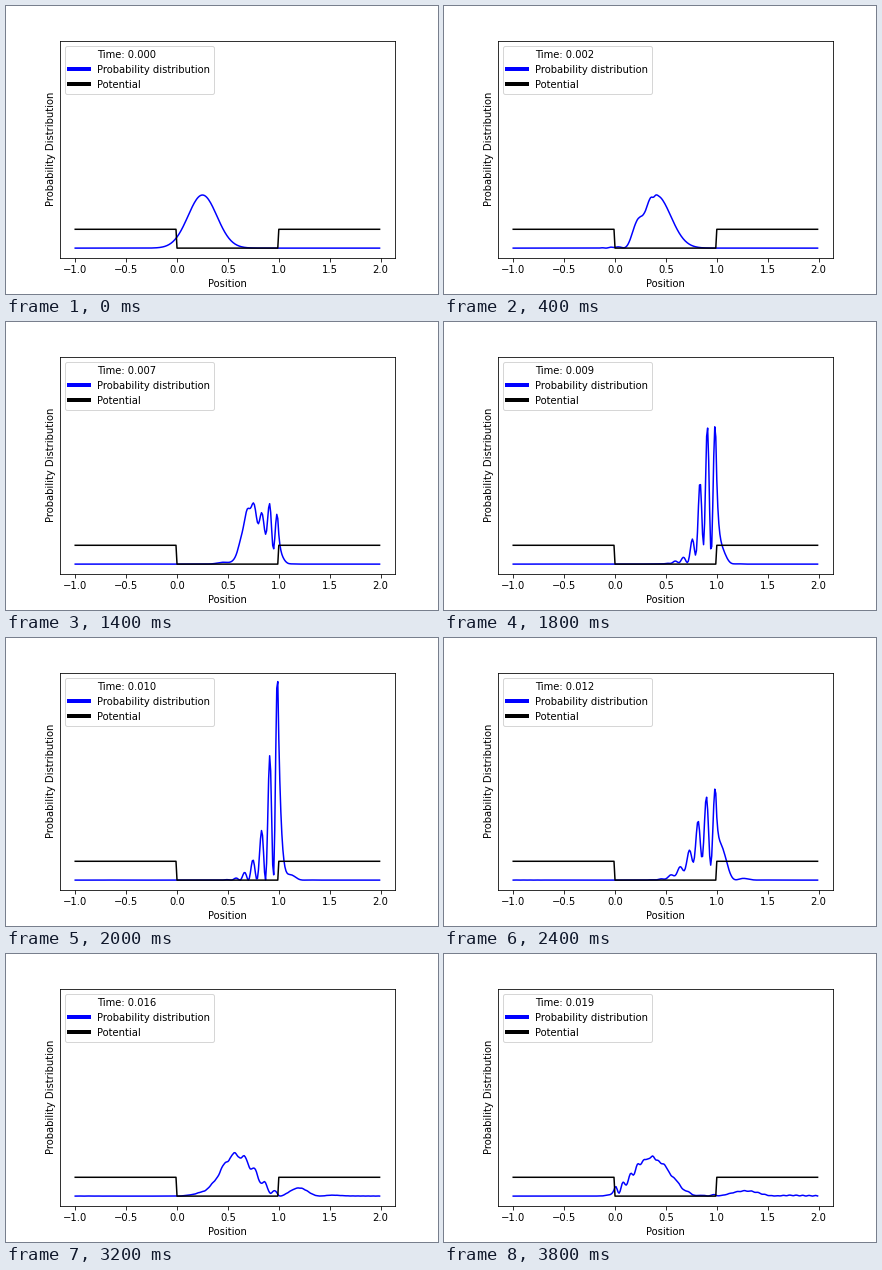
These frames come from a looping animation (432 px wide and 288 px high, 4 s). A matplotlib script:

```python
import numpy as np
import matplotlib.pyplot as plt
from matplotlib.animation import FuncAnimation
from matplotlib.lines import Line2D

FRAMES, INTERVAL = 20, 200
DT = 0.001            # simulated time per frame
N, DX = 300, 0.01
X0, WIDTH, K0 = 0.25, 0.2, 40.0
V0 = 2000.0

# Square well on a grid with hard outer walls
x = -1 + DX * np.arange(N)
wall = ((x < -DX / 2) | (x > 1 - DX / 2)).astype(float)

# H = -d^2/dx^2 + V, solved once by its eigenstates
hop = np.full(N - 1, -1 / DX**2)
H = np.diag(2 / DX**2 + V0 * wall) + np.diag(hop, 1) + np.diag(hop, -1)
energy, states = np.linalg.eigh(H)

psi0 = np.exp(-((x - X0) / WIDTH) ** 2 / 2 + 1j * K0 * x)
psi0 /= np.sqrt(np.sum(np.abs(psi0) ** 2) * DX)
coef = states.T @ psi0


def density(t):
    return np.abs(states @ (coef * np.exp(-1j * energy * t))) ** 2


plt.rcParams.update({"font.family": "DejaVu Sans", "font.size": 10})
fig, ax = plt.subplots(figsize=(6, 4), dpi=72, facecolor="white")
fig.subplots_adjust(left=0.125, right=0.9, bottom=0.125, top=0.88)

wave, = ax.plot(x, density(0), color="blue", lw=1.5)
ax.plot(x, wall, color="black", lw=1.5)

peak = 10.5
pad = 0.05 * (x[-1] - x[0])
ax.set_xlim(x[0] - pad, x[-1] + pad)
ax.set_ylim(-0.05 * peak, 1.05 * peak)
ax.set_xticks(np.arange(-1, 2.1, 0.5))
ax.set_yticks([])
ax.set_xlabel("Position")
ax.set_ylabel("Probability Distribution")

handles = [Line2D([0], [0], color=c, lw=4) for c in ("white", "blue", "black")]
legend = ax.legend(
    handles,
    ["Time: 0.000", "Probability distribution", "Potential"],
    loc="upper left",
)
clock = legend.get_texts()[0]


def update(i):
    t = i * DT
    wave.set_ydata(density(t))
    clock.set_text(f"Time: {t:.3f}")
    return wave, clock


anim = FuncAnimation(fig, update, frames=FRAMES, interval=INTERVAL,
                     repeat=True, repeat_delay=0, blit=False)
plt.show()
```
